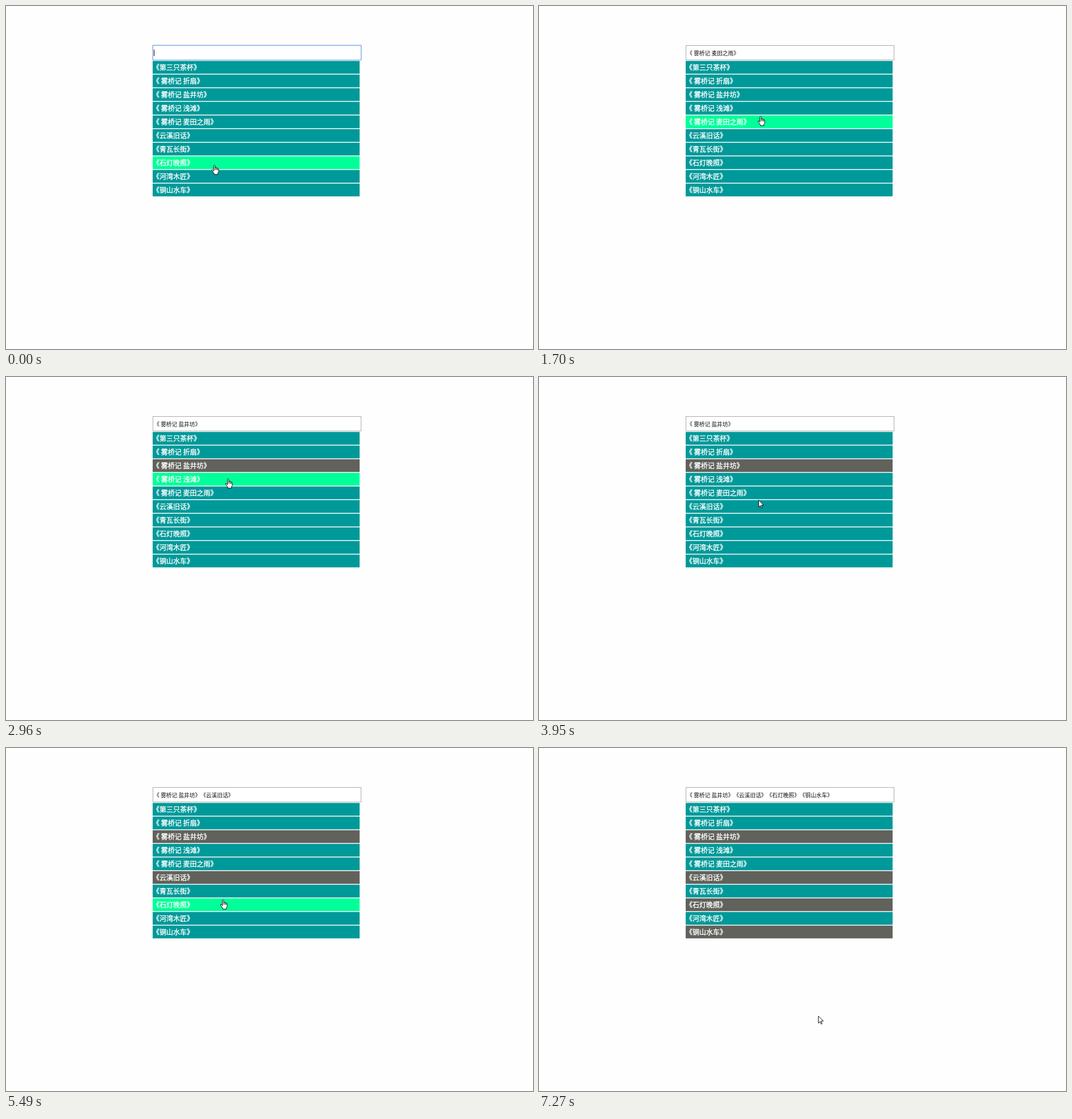
Animation, 927 px wide and 604 px high, one loop 8 s. Source, as an HTML page:

```html
<!DOCTYPE html>
<html lang="zh-CN">
<head>
<meta charset="utf-8">
<title>书单选择</title>
<style>
  html, body { margin: 0; width: 100%; height: 100%; overflow: hidden; background: #fefefe; }
  svg { display: block; width: 927px; height: 604px; }
  text {
    font-family: "Noto Sans CJK SC", "Noto Sans CJK", "Noto Sans", sans-serif;
    font-kerning: none;
    font-feature-settings: "chws" 0, "halt" 0;
    text-spacing-trim: space-all;
    white-space: pre;
  }
  #rows text { font-size: 12px; fill: #fff; stroke: #fff; stroke-width: .35; }
  #value { font-size: 9.7px; fill: #111; }
  #cursor path { fill: #fff; stroke: #000; stroke-width: 1.2; stroke-linejoin: round; }
</style>
</head>
<body>
<svg viewBox="0 0 927 604" xmlns="http://www.w3.org/2000/svg">
  <rect width="927" height="604" fill="#fefefe"/>
  <rect id="glow" x="257.5" y="68.5" width="368" height="27" rx="1" fill="none" stroke="#c9dbf7"/>
  <rect id="field" x="258.5" y="69.5" width="366" height="25.5" fill="#fff"/>
  <rect id="caret" x="260" y="77" width="1" height="11" fill="#000"/>
  <text id="value" x="260.3" y="86.6"></text>
  <g id="rows"></g>
  <g id="cursor">
    <path id="hand" d="M4.5 14V2Q4.5.5 6 .5T7.5 2V7Q7.5 5.7 9 5.7T10.5 7.5Q10.5 6.5 12 6.7T13.2 8.3Q15.5 7.5 15.5 10V15Q15.5 16.5 13.5 18.5V21.5H5.5V19.5L.8 13Q0 11 1 10.5T4.5 13M7.5 7V11.5M10.5 7.5V11.5M13.2 8.5V12"/>
    <path id="arrow" d="M.5 2V18L4.3 14.4 6.8 20.2 9 19.3 6.5 13.5H11.8Z"/>
  </g>
</svg>
<script>
const LOOP = 8000;
const FIRST_STEP = 520, STEP = 126.7;
const TOP = 97, PITCH = 24, ROW_H = 22;
const TEAL = '#009999', GREEN = '#00ff99', GREY = '#62625c';

const titles = [
  '《第三只茶杯》', '《 雾桥记 折扇》', '《 雾桥记 盐井坊》', '《 雾桥记 浅滩》',
  '《 雾桥记 麦田之雨》', '《云溪旧话》', '《青瓦长街》', '《石灯晚照》',
  '《河湾木匠》', '《铜山水车》'
];

// Pointer glides: first step, last step, x and y reached; it rests in between.
const glides = [
  [-1, 1, 376, 245], [1, 6, 385, 194], [9, 13, 386, 152],
  [18, 19, 386, 179], [19, 22, 386, 192], [22, 23, 385, 208],
  [23, 27, 386, 215.2], [28, 30, 385, 222], [36, 37, 382, 240],
  [37, 38, 377, 267], [42, 43, 376, 272], [43, 44, 371, 309.5],
  [44, 48, 368, 317], [51, 52, 437, 400], [52, 53, 491, 470.5]
];

// Each click picks the row under the pointer; from ADD_AFTER on, picks add up.
const clicks = [250, 1700, 2590, 4930, 5910, 6880];
const ADD_AFTER = 2590;

const $ = id => document.getElementById(id);
const show = (id, on) => $(id).setAttribute('visibility', on ? 'visible' : 'hidden');

function make(tag, attrs) {
  const el = document.createElementNS('http://www.w3.org/2000/svg', tag);
  for (const key in attrs) el.setAttribute(key, attrs[key]);
  return $('rows').appendChild(el);
}

const bars = titles.map((title, i) => {
  const y = TOP + i * PITCH;
  const bar = make('rect', { x: 258, y: y - .25, width: 364, height: ROW_H + .5 });
  make('text', { x: 258, y: y + 16 }).textContent = title;
  return bar;
});

function pointer(t) {
  const step = Math.floor((t - FIRST_STEP) / STEP);
  let x = 362, y = 280;
  for (const [from, to, toX, toY] of glides) {
    const u = Math.min(1, Math.max(0, (step - from) / (to - from)));
    const eased = u * (2 - u);
    x += (toX - x) * eased;
    y += (toY - y) * eased;
  }
  return { x, y };
}

function rowAt(y) {
  const row = Math.floor((y - TOP) / PITCH);
  const inside = y - TOP - row * PITCH < ROW_H;
  return inside && row < titles.length ? row : -1;
}

function pickedRows(t) {
  const done = clicks.filter(c => c <= t);
  const kept = t < ADD_AFTER ? done.slice(-1) : done.filter(c => c >= ADD_AFTER);
  return kept.map(c => rowAt(pointer(c).y));
}

function draw(t) {
  const { x, y } = pointer(t);
  const hover = rowAt(y);
  const picked = pickedRows(t);
  const focused = picked.length === 0;

  bars.forEach((bar, i) =>
    bar.setAttribute('fill', i === hover ? GREEN : picked.includes(i) ? GREY : TEAL));
  $('value').textContent = picked.map(i => titles[i]).join('');
  $('field').setAttribute('stroke', focused ? '#7ba5e6' : '#ababab');
  show('glow', focused);
  show('caret', focused);
  show('hand', hover >= 0);
  show('arrow', hover < 0);
  $('cursor').setAttribute('transform', `translate(${x} ${y}) scale(.78)`);
}

const start = performance.now();
function tick() {
  draw((performance.now() - start) % LOOP);
  requestAnimationFrame(tick);
}
tick();
</script>
</body>
</html>
```
